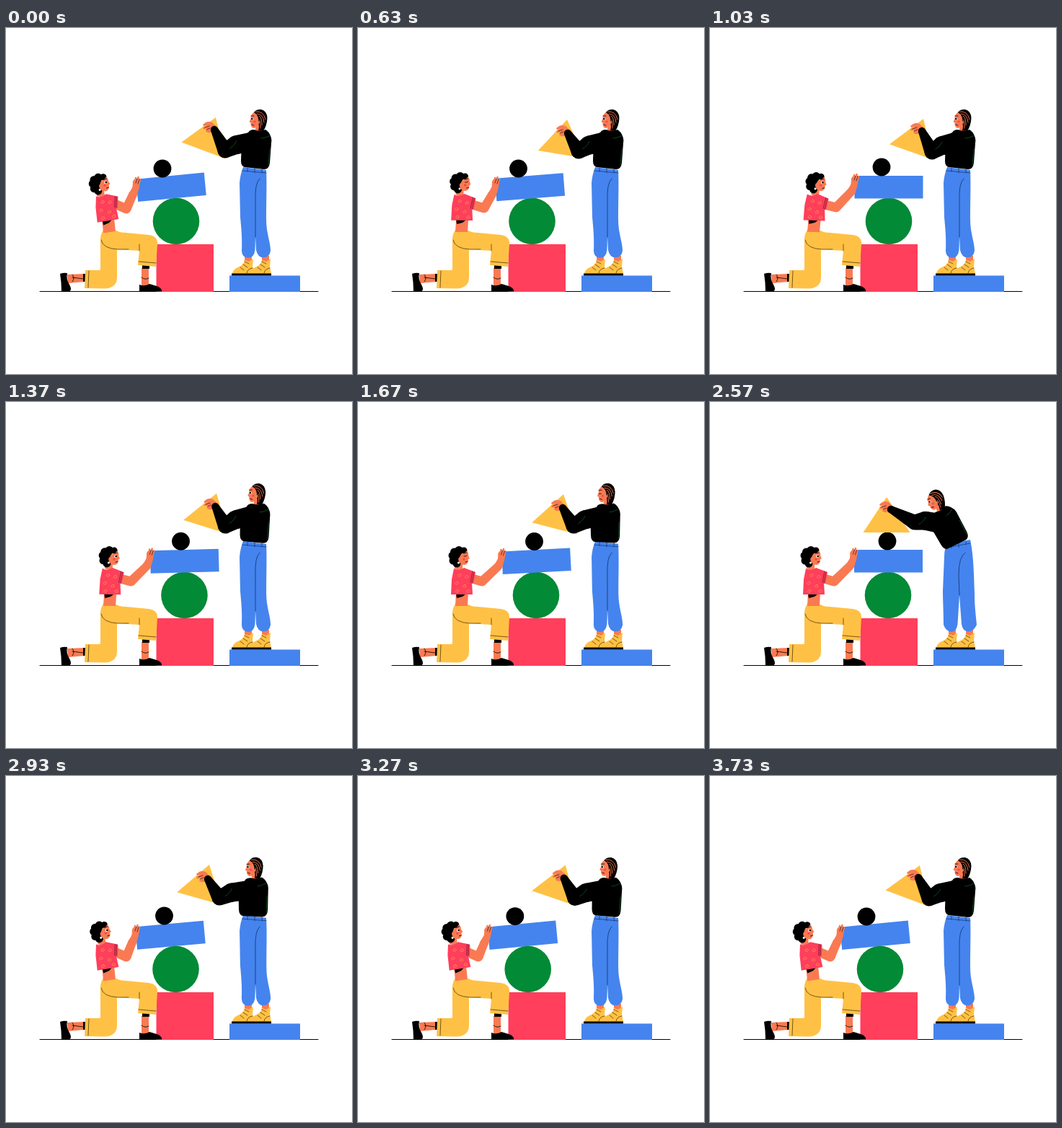
An HTML page with a canvas that plays this animation: 480 px wide and 480 px high, repeating every 3770 ms.

```html
<!DOCTYPE html>
<html lang="en">
<head>
<meta charset="utf-8">
<title>Building together</title>
<style>
  html, body { margin: 0; width: 100%; height: 100%; overflow: hidden; background: #fff; }
  canvas { display: block; }
</style>
</head>
<body>
<canvas id="stage" width="480" height="480"></canvas>
<script>
const ctx = document.getElementById('stage').getContext('2d');
const LOOP = 3770;
const RED = '#ff3f5b', BLUE = '#4584ee', GREEN = '#028a36', YELLOW = '#ffc145',
      SKIN = '#f97a52', INK = '#000', SEAM = '#6b4a10', NAVY = '#173a78', FOLD = '#075c29';

// Poses at the times below; every track returns to its first value.
const TIMES = [0, 630, 1030, 1670, 2570, 2930, 3730];
const TRACKS = {
  barX:    [229, 238.5, 248, 247.5, 247.5, 228],
  barTilt: [-5.5, -4.5, 0, -3, 0, -5.2],
  discX:   [236, 241.5, 248, 247, 247, 235.5],
  ballX:   [217, 222.5, 238, 244.5, 246, 219.5],
  ballY:   [195, 195, 193, 193.5, 193, 194],
  apexX:   [291, 290, 296, 285, 245, 282],
  apexY:   [124, 127, 126, 128, 132, 123],
  triTilt: [20.5, 9.5, 19.5, 14.5, 0, 16],
  wristX:  [289, 291, 294, 284, 251, 280],
  wristY:  [141, 146, 143, 147, 149, 143],
  elbowX:  [304, 306, 308, 299, 284, 296],
  elbowY:  [170, 171, 172, 172, 167, 169],
  manX:    [0, 0, 0, -2.5, -3, -2.5],
  manTilt: [0, 0, 0, -3, -32, -3],
  hips:    [0, 0, 0, 0.05, 1, 0.05],
  girlTilt:[-9, 0.5, 2, 0, 0, -9],
  headX:   [0, 1, 4.5, 0, 0, 1.5],
  armX:    [167, 175, 175, 172, 172, 167],
  armY:    [251, 250, 249, 249, 249, 251],
  handX:   [181, 191, 201, 199.5, 199.5, 180],
  handY:   [213, 213, 209, 210, 209, 213]
};

// Monotone cubic interpolation: smooth, with no overshoot at the poses.
function sample(values, t) {
  const v = [...values, values[0]];
  const slope = i => (v[i + 1] - v[i]) / (TIMES[i + 1] - TIMES[i]);
  const tangent = i => {
    if (i === 0 || i === v.length - 1) return 0;
    const a = slope(i - 1), b = slope(i);
    return a * b <= 0 ? 0 : 2 * a * b / (a + b);
  };
  if (t >= TIMES[6]) return v[6];
  const i = TIMES.findIndex(time => time > t) - 1;
  const span = TIMES[i + 1] - TIMES[i], u = (t - TIMES[i]) / span, w = 1 - u;
  return v[i] * (1 + 2 * u) * w * w + v[i + 1] * u * u * (3 - 2 * u)
       + span * u * w * (tangent(i) * w - tangent(i + 1) * u);
}

function fill(d, color) {
  ctx.fillStyle = color;
  ctx.fill(new Path2D(d));
}
function line(d, color = INK, width = 1) {
  ctx.strokeStyle = color;
  ctx.lineWidth = width;
  ctx.stroke(new Path2D(d));
}
function disc(x, y, r, color) {
  ctx.fillStyle = color;
  ctx.beginPath();
  ctx.arc(x, y, r, 0, 7);
  ctx.fill();
}
function turned(x, y, deg, dx, dy, draw) {
  ctx.save();
  ctx.translate(x + dx, y + dy);
  ctx.rotate(deg * Math.PI / 180);
  ctx.translate(-x, -y);
  draw();
  ctx.restore();
}
function turnPoint(px, py, x, y, deg) {
  const a = deg * Math.PI / 180, c = Math.cos(a), s = Math.sin(a);
  return [x + (px - x) * c - (py - y) * s, y + (px - x) * s + (py - y) * c];
}

// Tapered limb through joints [x, y, radius].
function limb(joints, color) {
  joints.forEach(([x, y, r], i) => {
    disc(x, y, r, color);
    if (!i) return;
    const [px, py, pr] = joints[i - 1], a = Math.atan2(y - py, x - px);
    const nx = -Math.sin(a), ny = Math.cos(a);
    fill(`M${px + nx * pr},${py + ny * pr} L${x + nx * r},${y + ny * r}
          L${x - nx * r},${y - ny * r} L${px - nx * pr},${py - ny * pr}Z`, color);
  });
}

function drawTower(p) {
  fill('M208.5,300H288V366H208.5Z', RED);
  disc(p.discX, 268, 32.3, GREEN);
  turned(p.barX, 221, p.barTilt, 0, 0, () => {
    ctx.fillStyle = BLUE;
    ctx.fillRect(p.barX - 47.5, 205, 95, 31.5);
  });
  disc(p.ballX, p.ballY, 12.4, INK);
}

function drawGirlLegs() {
  fill('M85,342 L109,341 V352 L86,354Z', SKIN);
  fill('M75,341 Q80,339 85,340 Q83,348 88,356 Q92,363 88,365.5 H77 Q77,353 75,341Z', INK);
  fill('M107,341H110V352H107Z', INK);
  line('M92,342 Q96,347 92,352 M92,346 L107,348', INK, 0.8);
  fill('M188,333H198V358H188Z', SKIN);
  fill('M189,329H199V334H189Z', INK);
  fill('M185,365.5 L185,356 Q192,359 199,355 L209,358 Q217,361 216,365.5Z', INK);
  line('M188,346 Q193,350 198,347', INK, 0.8);
  fill('M131,295 V334 Q131,336 128,336 L110,336 L109,361 L138,361.5 Q154,360 154,346 V303Z', YELLOW);
  fill(`M135,280 L153,281 Q158,284 166,284 L198,287 Q211,289 210,300
        L208,331 L183,329 L185,309 L152,307 Q131,306 131,293 Q131,286 135,280Z`, YELLOW);
  line('M132,294 Q134,306 155,307 H170 M185,300 V309 M115,337 L114,360 M184,324 L208,326', SEAM, 0.9);
}

function drawGirlHead(blink) {
  fill('M135,220 L145,220 L145,232 Q140,235 134,231Z', SKIN);
  for (const [x, y, r] of [[133.5, 208, 5.5], [140, 206, 6], [147, 206, 4.5], [131, 213, 5.5],
                           [132, 220, 5.5], [138, 215, 7], [137, 224, 5.5]]) disc(x, y, r, INK);
  fill(`M143,211 Q149,210 151,206 Q154,210 153,213 L155,217 L153,218
        Q153,225 148,226 Q142,226 140,221 Q138,217 141,215Z`, SKIN);
  if (blink) line('M147,214 Q149,215 151,213', INK, 0.8);
  else {
    disc(149, 214, 1.9, '#fff');
    disc(149.6, 214, 1.3, INK);
  }
  line('M147,210 L151,209 M149,222 L152,221.5', INK, 0.8);
  disc(147, 218, 1.6, RED);
  disc(139.5, 223, 1.5, '#fff');
}

function drawGirl(p, blink) {
  turned(145, 283, p.girlTilt, 0, 0, () => {
    fill('M136,264 H153 L152,283 H135Z', SKIN);
    fill('M136,266 H150 L145,270 L137,272Z', INK);
    ctx.save();
    ctx.translate(p.headX, 0);
    drawGirlHead(blink);
    ctx.restore();
  });

  const [sx, sy] = turnPoint(155, 244, 145, 283, p.girlTilt);
  const { armX, armY, handX, handY } = p;
  limb([[sx, sy, 6.5], [armX, armY, 6.5], [handX - 5, handY + 18, 5.8],
        [handX - 1, handY + 9, 4.6], [handX, handY + 1, 5]], SKIN);
  for (const [dx, top] of [[-4, 1], [-1, -5], [2.5, -6], [5, -3]])
    line(`M${handX + dx * 0.6},${handY + 3} L${handX + dx},${handY + top}`, SKIN, 2.6);
  line(`M${handX - 1},${handY + 2} l2,-6 M${handX + 2},${handY + 3} l2,-6`, INK, 0.6);

  turned(145, 283, p.girlTilt, 0, 0, () => {
    fill('M133,231 Q140,235 147,230 L163,236 L160,252 L158,251 L159,267 H129 L130,246Z', RED);
    line('M159,235 L156,250 M161,236 L158,251', '#7a1830', 0.8);
    for (const [x, y] of [[141, 240], [137, 251], [151, 242], [148, 255], [138, 262], [153, 262]])
      line(`M${x - 2.5},${y + 1} q1,-4 4,-2 q2,3 -3,3`, '#ff8a4d', 0.9);
  });
}

function drawManLegs(k) {
  fill('M331,316H341V324H331Z M355,316H365V324H355Z', SKIN);
  for (const x of [24, 0]) {
    fill(`M${331 + x},322 L${337 + x},324 L${343 + x},320 L${342 + x},331 L${344 + x},341
          H${314 + x} Q${315 + x},334 ${324 + x},331 Q${330 + x},328 ${331 + x},322Z`, YELLOW);
    line(`M${325 + x},332 l5,4 M${329 + x},328 l6,4 M${331 + x},324 l6,3 M${334 + x},340 q1,-6 8,-7`, SEAM, 0.9);
  }
  fill('M313,340.5H368V343.5H313Z', INK);
  const gap = 290 - 22 * k;
  fill(`M329,${193 + 5 * k} L361,${197 - 6 * k}
        C${362 + 4 * k},215 ${361 + 5 * k},240 ${361 + 6 * k},265
        C${361 + 6 * k},285 ${367 + 2 * k},297 ${367 + 3 * k},309
        Q366,318 ${357 + 2 * k},318.5 Q${349 + k},318 ${347 + 2 * k},308 L346,${gap}
        L${345.5 - 2 * k},308 Q${344 - 2 * k},319 ${336 - k},319
        Q327,318 ${327 - 3 * k},309 C${328 - 4 * k},290 ${326 - 3 * k},275 ${325 - 2 * k},262
        L${324 + k},215 Q325,203 329,${193 + 5 * k}Z`, BLUE);
  line(`M346,${gap} L${346 - k},240 Q345,215 ${352 + k * 2},209`, NAVY, 0.9);
  line(`M328,${198 + 4 * k} L361,${201 - 5 * k} M335,${194 + 4 * k} v5
        M345,${195 + k} v6 M355,${196 - 3 * k} v5`, NAVY, 0.8);
}

function drawManHead(blink) {
  fill(`M345,116 Q339,120 339.5,126 L337.5,130 L339.5,131.5 Q339,138 344,139
        L346,138 L346,145 L355,144 L353,118Z`, SKIN);
  fill(`M344,117 Q347,112.5 354,113 Q362,115 362.5,125 Q362,135 357,143
        L350,142 Q352,136 350,132 Q352,122 344,117Z`, INK);
  line('M346,116 Q358,115 360,127 M348,119 Q357,119 358,131 M351,122 Q355,123 355,135 M352,128 Q353,131 353,139', SKIN, 0.9);
  disc(349.5, 131, 2.2, SKIN);
  if (blink) line('M340,127 L343,127', INK, 0.8);
  else {
    disc(341.8, 126, 1.6, '#fff');
    disc(341.3, 126, 1.2, INK);
  }
  line('M340,122 L344,122 M341,134 L344,135', INK, 0.8);
  disc(345, 130, 1.5, RED);
}

function drawMan(p, blink) {
  drawManLegs(p.hips);
  const drop = 2.5 * p.hips;
  turned(346, 194, p.manTilt, p.manX, drop, () => {
    turned(352, 142, -p.manTilt * 0.3, 0, 0, () => drawManHead(blink));
    fill(`M336,145 Q338,141 344,141 Q352,144 360,141 Q365,144 367,150 Q369,154 368,160
          L366,187 Q365,196 358,196 L331,193 Q326,192 326,184 L327,152Z`, INK);
    line('M339,149 Q350,157 365,150 M366,168 L364,190', FOLD, 0.8);
  });

  const { apexX, apexY, wristX, wristY, elbowX, elbowY } = p;
  turned(apexX, apexY, p.triTilt, 0, 0, () =>
    fill(`M${apexX},${apexY} l32.5,49 h-65Z`, YELLOW));

  // Hand reaching left from the sleeve.
  fill(`M${wristX + 3},${wristY - 4} l-6,-6 q-5,-2 -9,0 l-4,3 l1,2 l5,-1 l-6,3 l1,2.5
        l5,-1 l-2,4 q4,3 8,1 l6,1Z`, SKIN);
  line(`M${wristX - 7},${wristY - 5} l-6,2 M${wristX - 6},${wristY - 2} l-5,2`, INK, 0.6);

  const [tx, ty] = turnPoint(341, 158, 346, 194, p.manTilt);
  const sx = tx + p.manX, sy = ty + drop;
  const midX = elbowX + (sx - elbowX) * 0.42, midY = elbowY + (sy - elbowY) * 0.42 - 3;
  limb([[sx, sy, 13.5], [midX, midY, 13], [elbowX, elbowY, 10.5], [wristX, wristY, 5.2]], INK);
  line(`M${midX - 9},${midY + 5} q6,-3 9,-10`, FOLD, 0.8);
}

function draw(t) {
  const p = {};
  for (const name in TRACKS) p[name] = sample(TRACKS[name], t);
  const near = time => Math.abs(t - time) < 90;
  ctx.lineCap = ctx.lineJoin = 'round';
  ctx.fillStyle = '#fff';
  ctx.fillRect(0, 0, 480, 480);
  line('M47,365.5H433');
  fill('M310,343.5H408V366H310Z', BLUE);
  drawTower(p);
  drawGirlLegs();
  drawGirl(p, near(630) || near(1670));
  drawMan(p, near(1670));
}

function tick(now) {
  draw(now % LOOP);
  requestAnimationFrame(tick);
}
requestAnimationFrame(tick);
</script>
</body>
</html>
```
